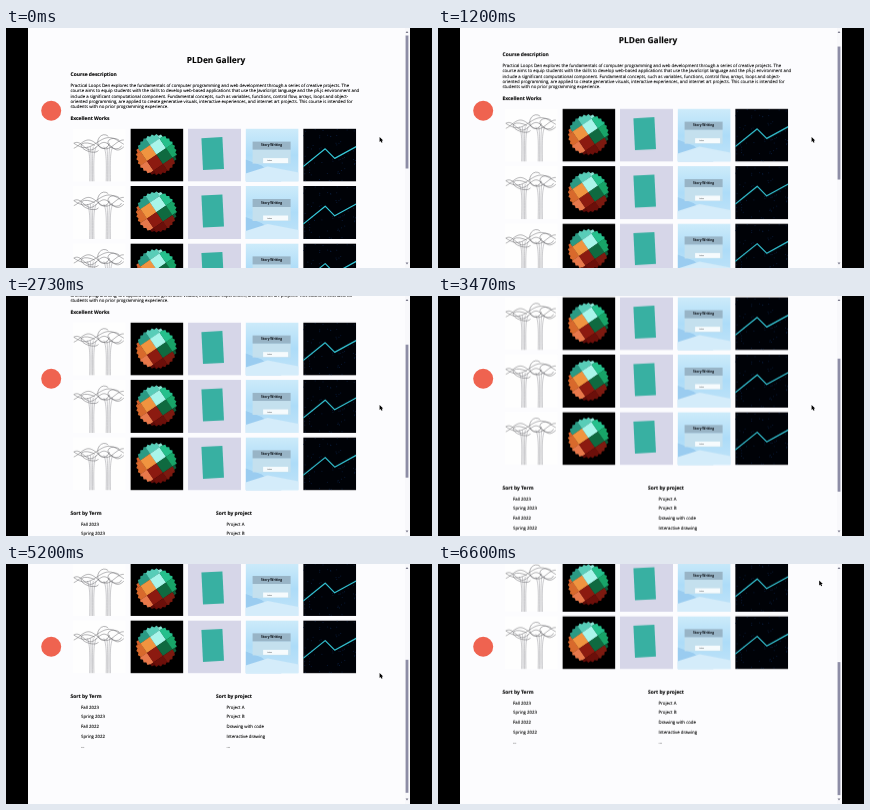
Recreate the animation shown at these times as an HTML page with a canvas. Size 426 by 240 pixels, loop 6670 ms.

```html
<!DOCTYPE html>
<html lang="en">
<head>
<meta charset="utf-8">
<title>Course gallery</title>
<style>
html, body { margin: 0; width: 100%; height: 100%; overflow: hidden; background: #000; }
#stage { position: relative; width: 426px; height: 240px; overflow: hidden; background: #000; }
#view { position: absolute; left: 22px; top: 0; width: 382px; height: 240px; overflow: hidden; background: #fcfcfe; }
#page { position: absolute; left: -22px; top: 0; width: 426px; height: 404px; will-change: transform; }
#page canvas { position: absolute; left: 0; top: 0; width: 426px; height: 404px; }
#page div {
  position: absolute; white-space: pre; color: #000;
  font: 4.33px/5.4px "Open Sans", "Noto Sans", sans-serif; text-rendering: geometricPrecision;
  -webkit-text-stroke: 0.1px #000;
}
#page .head { font-weight: 700; font-size: 4.95px; }
#page .title { font-weight: 700; font-size: 8.4px; transform: translateX(-50%); }
#over { position: absolute; left: 0; top: 0; width: 426px; height: 240px; }
</style>
</head>
<body>
<div id="stage">
  <div id="view"><div id="page"><canvas id="art"></canvas></div></div>
  <canvas id="over"></canvas>
</div>
<script>
const LOOP = 6670, STEP = 66.7, TILE = 53;
const page = document.getElementById('page');

function setup(id, w, h) {
  const c = document.getElementById(id), d = window.devicePixelRatio || 1;
  c.width = w * d;
  c.height = h * d;
  const g = c.getContext('2d');
  g.scale(d, d);
  return g;
}
const art = setup('art', 426, 404), over = setup('over', 426, 240);

// y is the middle of the text line
function label(text, x, y, cls = '') {
  const el = document.createElement('div');
  el.textContent = text;
  el.className = cls;
  el.style.left = x + 'px';
  el.style.top = y - 2.7 + 'px';
  page.appendChild(el);
}

label('PLDen Gallery', 210, 33, 'title');
label('Course description', 64.5, 47.9, 'head');
[
  'Practical Loops Den explores the fundamentals of computer programming and web development through a series of creative projects. The',
  'course aims to equip students with the skills to develop web-based applications that use the JavaScript language and the p5.js environment and',
  'include a significant computational component. Fundamental concepts, such as variables, functions, control flow, arrays, loops and object-',
  'oriented programming, are applied to create generative visuals, interactive experiences, and internet art projects. This course is intended for',
  'students with no prior programming experience.'
].forEach((line, i) => label(line, 64.5, 58.4 + i * 5.4));
label('Excellent Works', 64.5, 91.7, 'head');

function list(title, x, items) {
  label(title, x, 292.6, 'head');
  items.forEach((s, i) => label(s, x + 10.5, 303.2 + i * 9.8));
}
list('Sort by Term', 64.5, ['Fall 2023', 'Spring 2023', 'Fall 2022', 'Spring 2022', '...']);
list('Sort by project', 210, ['Project A', 'Project B', 'Drawing with code', 'Interactive drawing', '...']);

function rect(g, color, x, y, w, h) {
  g.fillStyle = color;
  g.fillRect(x, y, w, h);
}
function shape(g, pts) {
  g.beginPath();
  pts.forEach(([x, y]) => g.lineTo(x, y));
}
function rng(seed) {
  return () => (seed = (seed * 16807) % 2147483647) / 2147483647;
}

function sketch(g) {
  rect(g, '#fefefe', 0, 0, TILE, TILE);
  g.strokeStyle = '#8c8c92';
  g.lineWidth = 0.45;
  // trunks
  for (const cx of [19, 35.5]) {
    for (const k of [-1.5, -0.5, 0.5, 1.5]) {
      g.beginPath();
      g.moveTo(cx + k * 3, 18);
      g.bezierCurveTo(cx + k * 1.2, 24, cx + k * 1.2, 32, cx + k * 1.4, TILE);
      g.stroke();
    }
  }
  // tangled branches
  g.strokeStyle = '#55555a';
  for (let k = 0; k < 3; k++) {
    g.beginPath();
    for (let x = 1; x <= 51; x++) {
      g.lineTo(x, 14 + k * 1.8 + (5 - k * 0.6) * Math.sin(x * (0.13 + k * 0.05) + k * 1.9));
    }
    g.stroke();
  }
  for (const [x, y, rx, ry] of [[31, 13, 6, 7], [42, 15, 7, 5], [17, 19, 9, 4]]) {
    g.beginPath();
    g.ellipse(x, y, rx, ry, 0.3, 0, 5.2);
    g.stroke();
  }
}

function ball(g) {
  rect(g, '#000', 0, 0, TILE, TILE);
  g.save();
  g.translate(26, 26);
  g.beginPath();
  for (let i = 0; i < 56; i++) {
    const r = i % 2 ? 19 : 20.6, a = i * Math.PI / 28;
    g.lineTo(r * Math.cos(a), r * Math.sin(a));
  }
  g.clip();
  g.rotate(-0.6);
  const rows = [
    ['#d8602c', '#2a9a84', '#58cdb8', '#8feadb'],
    ['#d8692c', '#f09440', '#a9f5ea', '#25c08c'],
    ['#e8784a', '#8c1a10', '#0f6a40', '#18a468'],
    ['#5e0b08', '#6c0f0a', '#7c1a10', '#0d5a38']
  ];
  rows.forEach((row, j) => row.forEach((c, i) =>
    rect(g, c, (i - 2) * 11.5, (j - 2) * 11.5, 11.7, 11.7)));
  g.restore();
}

function block(g) {
  rect(g, '#d6d6e8', 0, 0, TILE, TILE);
  g.save();
  g.translate(24.7, 25);
  g.rotate(-0.05);
  rect(g, '#38b0a2', -10.5, -16, 21, 32);
  g.restore();
}

function form(g) {
  const sky = g.createLinearGradient(0, 0, 0, TILE);
  sky.addColorStop(0, '#cdebfa');
  sky.addColorStop(0.5, '#addcf8');
  sky.addColorStop(1, '#c2e4f8');
  rect(g, sky, 0, 0, TILE, TILE);
  g.fillStyle = '#9accf0';
  shape(g, [[0, 31], [16, 37], [36, TILE], [0, TILE]]);
  g.fill();
  g.fillStyle = '#d4ecfa';
  shape(g, [[0, 45], [22, 38], [TILE, 44], [TILE, TILE], [0, TILE]]);
  g.fill();
  rect(g, '#c4e0ee', 7, 21, 38, 14);
  rect(g, '#98b4c6', 7, 13, 38, 8);
  rect(g, '#f6fbfd', 17.5, 29.5, 25, 5);
  g.save();
  g.scale(0.1, 0.1);
  g.textAlign = 'center';
  g.textBaseline = 'middle';
  g.fillStyle = '#0a0e14';
  g.font = '700 32px "Open Sans", sans-serif';
  g.fillText('Story Writing', 260, 170);
  g.font = '24px "Open Sans", sans-serif';
  g.fillText('title', 240, 320);
  g.restore();
}

function chart(g) {
  rect(g, '#000207', 0, 0, TILE, TILE);
  const rnd = rng(77);
  for (let i = 0; i < 60; i++) rect(g, '#0b2040', rnd() * 52, rnd() * 52, 0.9, 0.9);
  g.strokeStyle = '#35c8d8';
  g.lineWidth = 1.2;
  g.lineJoin = 'round';
  shape(g, [[0, 38], [22, 20.2], [31.5, 29.8], [TILE, 18]]);
  g.stroke();
}

function drawTiles() {
  for (let row = 0; row < 3; row++) {
    [sketch, ball, block, form, chart].forEach((draw, col) => {
      art.save();
      art.translate(66.8 + col * 57.6, 100.6 + row * 57.4);
      art.beginPath();
      art.rect(0, 0, TILE, TILE);
      art.clip();
      draw(art);
      art.restore();
    });
  }
}

function track(keys, t) {
  let i = 1;
  while (i < keys.length - 1 && t > keys[i][0]) i++;
  const [t0, a] = keys[i - 1], [t1, b] = keys[i];
  return a + (b - a) * Math.min(1, Math.max(0, (t - t0) / (t1 - t0)));
}
const SCROLL = [[0, 0], [670, 0], [730, 2], [1730, 40], [2730, 74], [4270, 127], [5200, 159], [5330, 163.3]];

function arrow(x, y, dir) {
  over.fillStyle = '#77778a';
  shape(over, [[x - 1.4, y + dir], [x + 1.4, y + dir], [x, y - dir]]);
  over.fill();
}

function pointer(x, y) {
  over.fillStyle = '#000';
  shape(over, [[x, y], [x, y + 5], [x + 1.1, y + 4], [x + 2, y + 5.8], [x + 2.9, y + 5.3], [x + 2.1, y + 3.6], [x + 3.6, y + 3.5]]);
  over.fill();
}

function render(now) {
  const n = Math.floor((now % LOOP + 6) / STEP) % 100, t = n * STEP;
  const y = track(SCROLL, t);
  page.style.transform = `translateY(${-y}px)`;

  over.clearRect(0, 0, 426, 240);
  rect(over, '#f8f8fb', 399, 0, 5, 240);
  rect(over, '#8d8da6', 399.6, 7.5 + y * 0.555, 2.8, 133);
  arrow(401, 4, 1);
  arrow(401, 235.5, -1);

  over.fillStyle = '#ef6350';
  over.beginPath();
  over.arc(45.2, 82.8, 10, 0, Math.PI * 2);
  over.fill();

  const k = track([[5700, 0], [6400, 1]], t), e = k * k * (3 - 2 * k);
  pointer(373.6 + 7.6 * e, 109 - 92.5 * e);
}

drawTiles();
const start = performance.now();
function tick() {
  render(performance.now() - start);
  requestAnimationFrame(tick);
}
tick();
</script>
</body>
</html>
```
